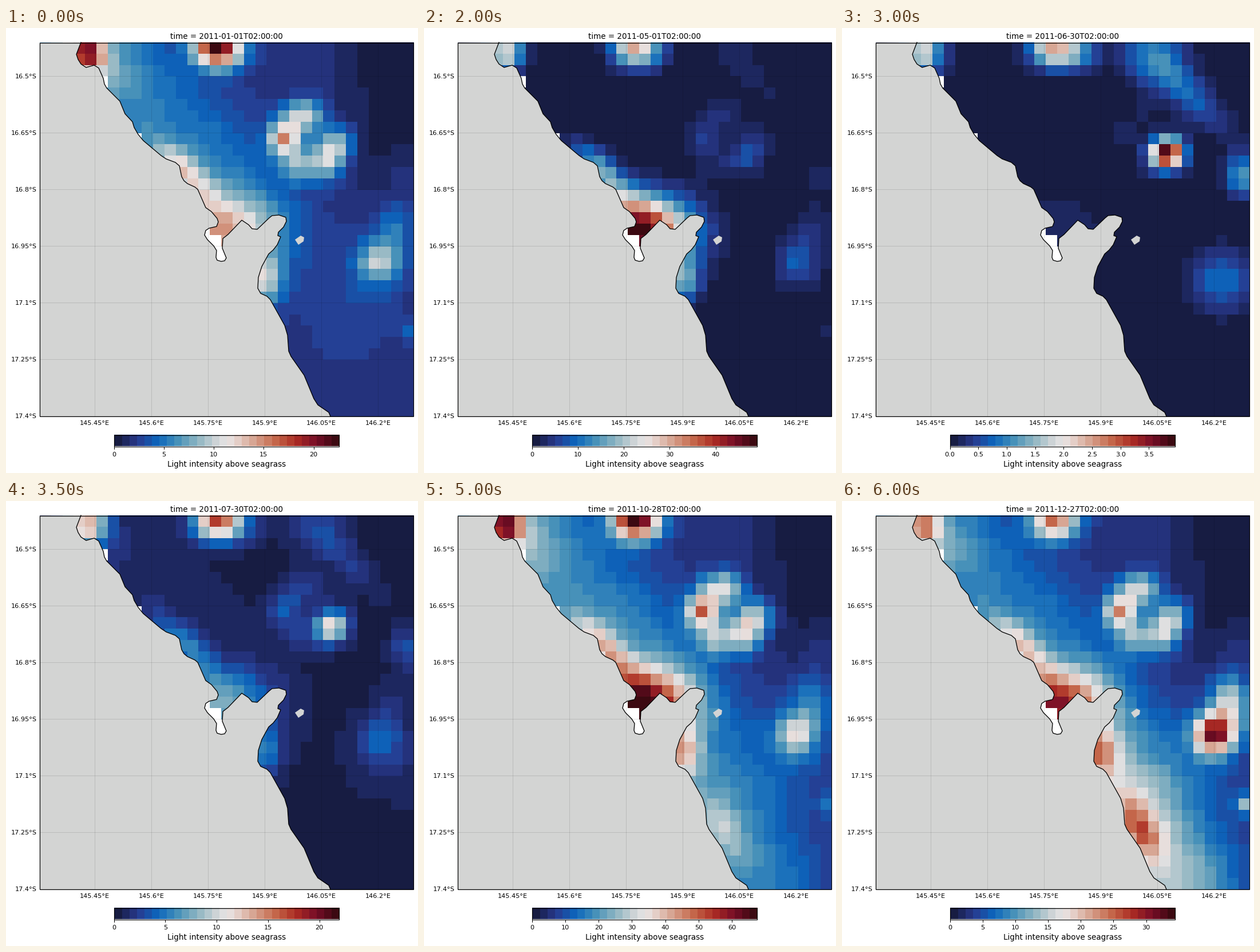
A matplotlib script for the animation above (6500 ms loop, 720x778 px).

```python
import numpy as np
import matplotlib.pyplot as plt
from matplotlib.animation import FuncAnimation
from matplotlib.colors import LinearSegmentedColormap
from matplotlib.patches import Polygon, Rectangle

W, H, DPI = 720, 778, 100
PX = 72 / DPI
LEFT, RIGHT, TOP, BOTTOM = 58.5, 712.0, 25.5, 679.0
CELLS = 33
SIZE = (RIGHT - LEFT) / CELLS
BAR = (188.5, 582.0, 712.0, 731.5)
LAND = "#d3d4d3"
MONTHS = 13

plt.rcParams["font.family"] = "DejaVu Sans"

# Blue to red diverging scale, light in the middle
BLUES = ["#171c42", "#293a8f", "#0b66bd", "#4590b9", "#8eb5c2", "#d2d6d8"]
REDS = ["#e6d2cc", "#d59d89", "#c46548", "#ac2b24", "#780e28", "#3c0911"]
scale = [(i / 11, c) for i, c in enumerate(BLUES + REDS)]
scale.insert(6, (0.5, "#e8e6e6"))
CMAP = LinearSegmentedColormap.from_list("light", scale, N=30)

# Coastline from the north edge to the south edge
NORTH = [(131, 25), (123, 46), (126, 55), (131, 63), (140, 69), (154, 65),
         (162, 70), (170, 88), (172, 98), (176, 105), (199, 128), (208, 150),
         (221, 164), (224, 174), (231, 186), (240, 197), (271, 223),
         (280, 229), (296, 235), (303, 241), (307, 260), (311, 267),
         (317, 272), (330, 278), (335, 282), (349, 314), (359, 321),
         (369, 333)]
INLET = [(371, 339), (368, 347), (355, 350), (349, 354), (347, 362),
         (352, 370), (363, 381), (368, 389), (367, 401), (369, 406),
         (376, 408), (382, 407), (385, 402), (378, 385), (379, 368),
         (388, 361), (412, 336), (424, 344), (430, 351), (439, 352),
         (460, 332), (465, 328), (477, 327), (489, 331), (490, 338),
         (485, 348), (476, 357)]
SOUTH = [(475, 363), (480, 365), (474, 379), (467, 388), (459, 395),
         (447, 417), (441, 436), (440, 455), (445, 464), (456, 469),
         (462, 475), (487, 520), (492, 537), (494, 565), (498, 574),
         (521, 607), (538, 648), (545, 659), (564, 672), (567, 679)]
ISLAND = [(505, 370), (515, 363), (521, 366), (520, 373), (511, 379)]

COLS, ROWS = np.meshgrid(np.arange(CELLS), np.arange(CELLS))


def bump(col, row, length, breadth, angle=0):
    """Elliptic Gaussian on the cell grid."""
    t = np.radians(angle)
    dx, dy = COLS - col, ROWS - row
    along = dx * np.cos(t) + dy * np.sin(t)
    across = dy * np.cos(t) - dx * np.sin(t)
    return np.exp(-0.5 * ((along / length) ** 2 + (across / breadth) ** 2))


def shelf(coast, reach):
    """Flat near the coast, falling off about `reach` cells away."""
    x, y = ((np.array(coast) - (LEFT, TOP)) / SIZE - 0.5).T
    steps = np.linspace(0, len(x) - 1, 5 * len(x))
    x, y = (np.interp(steps, np.arange(len(x)), v) for v in (x, y))
    gap = np.hypot(COLS[..., None] - x, ROWS[..., None] - y).min(axis=-1)
    return 1 / (1 + (gap / reach) ** 4)


# Shapes on the sea floor
north_shelf = shelf(NORTH, 6.5) + 0.6 * bump(6, 2.6, 1.6, 1.6)
south_shelf = (shelf(SOUTH, 5.5) / (1 + np.exp((19 - ROWS) / 1.5))
               + 1.3 * bump(22.7, 27, 2.5, 1.2, 60))
open_sea = (1 - np.exp(-(np.hypot(COLS - 31, ROWS - 4) / 9) ** 2)
            + 0.7 * bump(27, 22, 3, 5))
shore = bump(12.3, 11, 2.4, 0.9, 45) + bump(19.3, 20.5, 1.1, 1.4)
bay = bump(15.2, 16.2, 3.2, 2.1)
top_reefs = bump(15.2, -0.1, 1.4, 1.2) + 0.8 * bump(3.6, 0.4, 1.2, 1.15)
ring = sum(bump(23.4 + 2.4 * np.cos(a), 8.2 + 2.4 * np.sin(a), 1.1, 1.1)
           for a in np.radians([0, 60, 120, 180, 230, 270]))
ring += bump(21, 7.9, 0.8, 0.8)
rock = bump(25.2, 9.3, 1, 0.9)
east_reef = (bump(29.3, 18.8, 1.2, 1.2) + 0.5 * bump(30.7, 16.2, 1.2, 1.8)
             + 0.35 * bump(32, 25, 0.6, 0.6))
drift = (bump(24, 0.5, 2, 2) + bump(26.8, 3.7, 3.2, 1.1, 45)
         + 1.5 * bump(31.8, 11.2, 1, 1.3) + bump(17.5, 0.5, 1.2, 1)
         + bump(30, 20.5, 1.8, 1.8))

no_data = (((COLS == 5) & (ROWS == 3)) | ((COLS == 8) & (ROWS == 8))
           | ((COLS == 14) & (ROWS > 15)) | ((COLS == 15) & (ROWS > 16))
           | ((COLS == 16) & (ROWS > 17)))

KEYS = [0, 2, 4, 6, 9, 11, 12]
PEAK = [22.55, 9.79, 49.0, 3.96, 57.8, 77.2, 34.4]
BAY = [0.42, 0.3, 1, 0.05, 0.8, 0.74, 0.62]


def light(month):
    """Light at the sea floor as a share of the month's peak."""
    clear = abs(np.cos(np.pi * (month - 10.7) / 12)) ** 3
    murk = np.exp(-(month - 6.0) ** 2)
    late = max(0, month - 8) / 4
    field = (clear * (0.2 * north_shelf + 0.085 * open_sea)
             + 0.3 * late * south_shelf
             + 0.33 * (1 - murk) * shore
             + np.interp(month, KEYS, BAY) * bay
             + (0.75 + 0.2 * np.cos(np.pi * (month - 1) / 4)) * top_reefs
             + (0.05 + 0.24 * clear) * (1 - 0.7 * murk) * ring
             + (0.1 + 0.1 * clear + 0.9 * murk) * rock
             + (0.15 + 0.2 * clear + 0.45 * late ** 6) * (1 - murk) * east_reef
             + (0.03 + 0.17 * murk) * drift)
    return np.ma.masked_where(no_data, np.clip(field, 0, 1))


fig = plt.figure(figsize=(W / DPI, H / DPI), dpi=DPI, facecolor="white")
ax = fig.add_axes([0, 0, 1, 1])
ax.axis("off")


def label(x, y, text, size, ha="center"):
    return ax.text(x, y, text, fontsize=size * PX, ha=ha, va="baseline")


def frame(x0, x1, y0, y1):
    ax.add_patch(Rectangle((x0, y0), x1 - x0, y1 - y0, fill=False,
                           ec="black", lw=1.15 * PX, zorder=6))


def degrees(value, side):
    return f"{value:.2f}".rstrip("0") + "°" + side


# Map
sea = ax.imshow(light(0), cmap=CMAP, vmin=0, vmax=1, aspect="auto",
                interpolation="nearest", extent=(LEFT, RIGHT, BOTTOM, TOP))
coast = NORTH + INLET + SOUTH
ax.add_patch(Polygon([(LEFT, TOP)] + coast + [(LEFT, BOTTOM)],
                     fc=LAND, ec="none", zorder=2))
ax.add_patch(Polygon(ISLAND, fc=LAND, ec="none", zorder=2))
ax.plot(*zip(*coast), color="black", lw=1.3 * PX, zorder=5)

grid = dict(color="black", alpha=0.13, lw=0.9 * PX, zorder=4)
for i in range(6):
    x = 155 + 99 * i
    ax.plot([x, x], [TOP, BOTTOM], **grid)
    label(x, 694.3, degrees(145.45 + 0.15 * i, "E"), 11.25)
for i in range(7):
    y = 84 + 99 * i
    ax.plot([LEFT, RIGHT], [y, y], **grid)
    label(54, y + 4, degrees(16.5 + 0.15 * i, "S"), 11.25, "right")
frame(LEFT, RIGHT, TOP, BOTTOM)

# Colour bar
x0, x1, y0, y1 = BAR
ax.imshow(np.linspace(0, 1, 394)[None, :], cmap=CMAP, aspect="auto",
          interpolation="nearest", extent=(x0, x1, y1, y0))
frame(*BAR)
label((x0 + x1) / 2, 767.5, "Light intensity above seagrass", 13.5)

title = label((LEFT + RIGHT) / 2, 18.7, "", 13.5)
ticks = [(ax.plot([], [], color="black", lw=PX)[0],
          label(0, 749.3, "", 11.25)) for _ in range(9)]
ax.set_xlim(0, W)
ax.set_ylim(H, 0)


def tick_step(peak):
    """Smallest round step that needs at most eight intervals."""
    steps = [m * 10.0 ** e for e in (-1, 0, 1) for m in (1, 2, 5)]
    return next(s for s in steps if s * 8 >= peak)


def update(month):
    sea.set_data(light(month))
    day = np.datetime64("2011-01-01") + 30 * month
    title.set_text(f"time = {day}T02:00:00")
    peak = np.interp(month, KEYS, PEAK)
    step = tick_step(peak)
    for i, (mark, text) in enumerate(ticks):
        shown = i * step <= peak
        x = x0 + (x1 - x0) * i * step / peak
        mark.set_data([x, x], [y1, y1 + 4.5])
        text.set_x(x)
        text.set_text(f"{i * step:.1f}" if step < 1 else f"{i * step:.0f}")
        mark.set_visible(shown)
        text.set_visible(shown)
    return [sea, title]


anim = FuncAnimation(fig, update, frames=MONTHS, interval=500,
                     init_func=lambda: update(0), repeat=True, repeat_delay=0)
plt.show()
```
